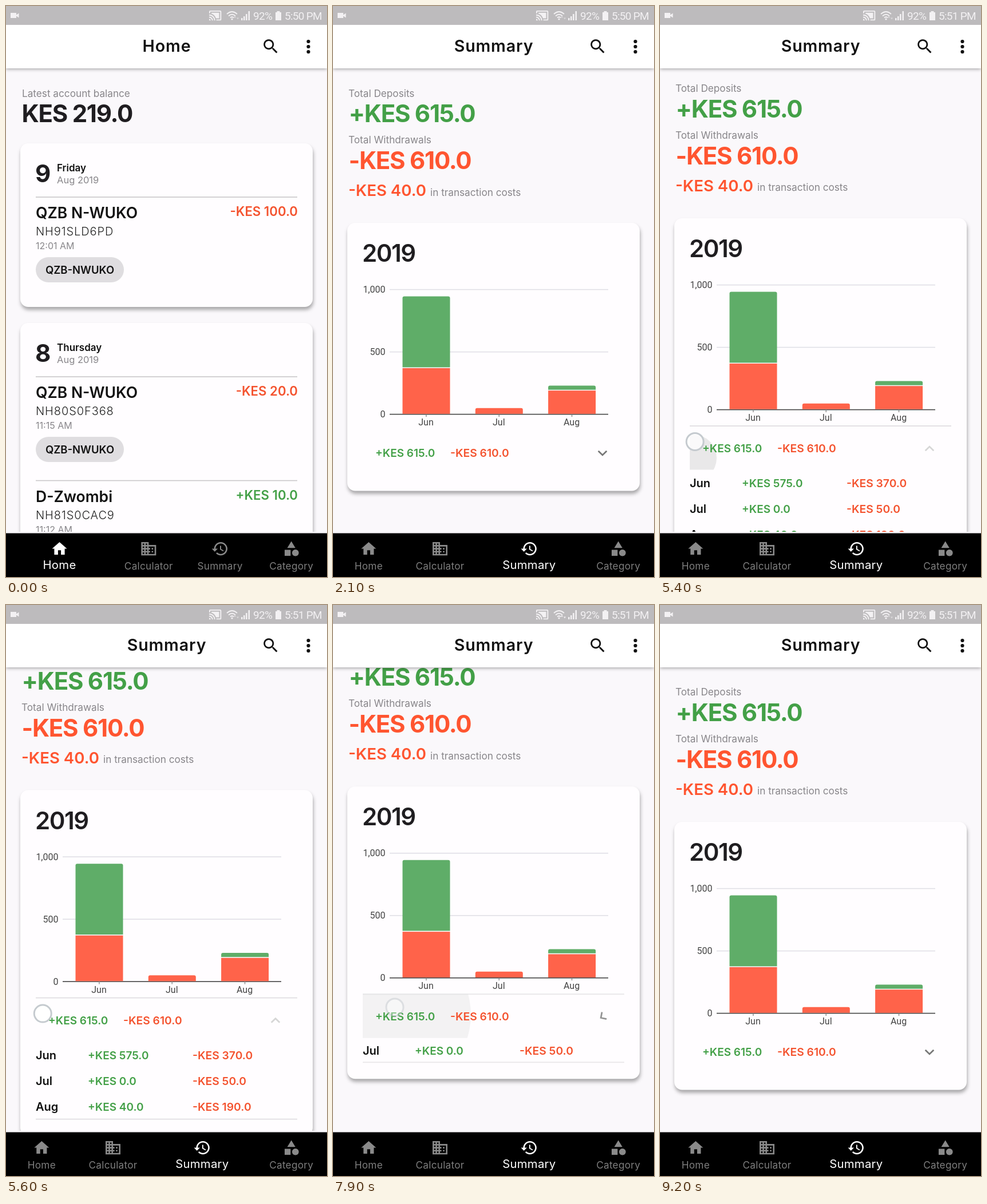
An HTML page for the animation above (9.8 s loop, 561 by 998 pixels).

```html
<!DOCTYPE html>
<html lang="en">
<head>
<meta charset="utf-8">
<style>
  html, body { margin: 0; width: 100%; height: 100%; overflow: hidden; background: #faf8fb; }
  svg { display: block; width: 100vw; height: 100vh; font-family: Inter, sans-serif; }
  .card { fill: #fffdff; filter: drop-shadow(1.5px 5px 3px rgba(0, 0, 0, .33)); }
  .bar { filter: drop-shadow(0 1px 3px rgba(0, 0, 0, .4)); }
  .roboto { font-family: Roboto, sans-serif; }
</style>
</head>
<body>
<svg id="stage" viewBox="0 0 561 998" preserveAspectRatio="none"></svg>
<script>
const LOOP = 9800, STEP = 100;
const GREEN = '#43a047', RED = '#f4532f', INK = '#1f1d20', GREY = '#88868a', STATUS = '#f3f1f3';
const BODY = 135.5;                      // height of the open month list
const NAV_ICONS = {
  Home: 'M10 20v-6h4v6h5v-8h3L12 3 2 12h3v8z',
  Calculator: 'M12 7V3H2v18h20V7H12zM6 19H4v-2h2v2zm0-4H4v-2h2v2zm0-4H4V9h2v2zm0-4H4V5h2v2zm4 12H8v-2h2v2zm0-4H8v-2h2v2zm0-4H8V9h2v2zm0-4H8V5h2v2zm10 12h-8v-2h2v-2h-2v-2h2v-2h-2V9h8v10zm-2-8h-2v2h2v-2zm0 4h-2v2h2v-2z',
  Summary: 'M13 3c-4.97 0-9 4.03-9 9H1l3.89 3.89.07.14L9 12H6c0-3.87 3.13-7 7-7s7 3.13 7 7-3.13 7-7 7c-1.93 0-3.68-.79-4.94-2.06l-1.42 1.42C8.27 19.99 10.51 21 13 21c4.97 0 9-4.03 9-9s-4.03-9-9-9zm-1 5v5l4.28 2.54.72-1.21-3.5-2.08V8H12z',
  Category: 'M12 2l-5.5 9h11zM3 13.5h8v8H3zM17.5 13a4.5 4.5 0 1 0 .01 0z'
};
const SEARCH = 'M15.5 14h-.79l-.28-.27A6.5 6.5 0 1 0 13.73 14.43l.27.28v.79l5 4.99L20.49 19zm-6 0a4.5 4.5 0 1 1 0-9 4.5 4.5 0 0 1 0 9z';
const CAST = 'M21 3H3c-1.1 0-2 .9-2 2v3h2V5h18v14h-7v2h7c1.1 0 2-.9 2-2V5c0-1.1-.9-2-2-2zM1 18v3h3c0-1.66-1.34-3-3-3zm0-4v2c2.76 0 5 2.24 5 5h2c0-3.87-3.13-7-7-7zm0-4v2c4.97 0 9 4.03 9 9h2c0-6.08-4.93-11-11-11zM5 7v1.63c3.96 1.28 7.09 4.41 8.37 8.37H19V7z';

const clamp = (v, lo = 0, hi = 1) => Math.min(hi, Math.max(lo, v));
const mix = (a, b, k) => a + (b - a) * k;
const text = (s, x, y, size, weight = 400, fill = INK, extra = '') =>
  `<text x="${x}" y="${y}" font-size="${size}" font-weight="${weight}" fill="${fill}" ${extra}>${s}</text>`;
const rect = (x, y, w, h, fill, extra = '') =>
  `<rect x="${x}" y="${y}" width="${w}" height="${h}" fill="${fill}" ${extra}/>`;
const card = (y, h, id = '') => `<rect ${id} class="card" x="25" y="${y}" width="511" height="${h}" rx="14"/>`;
const rule = (y, fill = '#c9c7c9') => rect(52, y - .8, 457, 1.6, fill);
const spaced = em => `letter-spacing="${em}em"`;
const caption = (s, x, y) => text(s, x, y, 17.2, 400, GREY);
const headline = (s, y, fill) => text(s, 27.5, y, 42, 700, fill, spaced(-.03));
const END = 'text-anchor="end"', MID = 'text-anchor="middle"';

function day(y, date, name) {
  return text(date, 51, y + 67.5, 42, 700) + text(name, 89, y + 49, 17, 600, '#111') +
    text('Aug 2019', 89, y + 70, 16.5, 400, GREY);
}

function entry(y, name, code, time, amount, fill, chip) {
  return rule(y) + text(name, 52, y + 37, 26.5, 600, '#111') +
    text(code, 52, y + 67, 20, 300, '#222', spaced(.045)) + text(time, 52, y + 91, 16, 400, GREY) +
    text(amount, 510, y + 33, 22.2, 600, fill, END) +
    (chip ? rect(52, y + 105, 154, 44, '#dfdde0', 'rx="22"') + text(chip, 129, y + 134, 18.5, 600, '#111', MID) : '');
}

const homePage = caption('Latest account balance', 28, 158.5) + headline('KES 219.0', 203, INK) +
  card(240, 286) + day(240, 9, 'Friday') +
  entry(334, 'QZB N-WUKO', 'NH91SLD6PD', '12:01 AM', '-KES 100.0', RED, 'QZB-NWUKO') +
  card(554, 460) + day(554, 8, 'Thursday') +
  entry(648, 'QZB N-WUKO', 'NH80S0F368', '11:15 AM', '-KES 20.0', RED, 'QZB-NWUKO') +
  entry(829.5, 'D-Zwombi', 'NH81S0CAC9', '11:12 AM', '+KES 10.0', GREEN);

function chart() {
  const axis = 713.6, scale = .218;
  const months = [['Jun', 575, 370], ['Jul', 0, 50], ['Aug', 40, 190]];
  const grid = [0, 500, 1000].map(v => {
    const y = axis - v * scale;
    return rect(99, y - .8, 382, 1.6, v ? '#e0dfe6' : '#444') +
      text(v.toLocaleString('en-US'), 91.5, y + 5.7, 16, 400, '#444', `class="roboto" ${END}`);
  }).join('');
  const bars = months.map(([name, inflow, outflow], i) => {
    const x = 121.5 + 127.3 * i, split = axis - outflow * scale, top = split - inflow * scale;
    const rounded = (y, bottom, fill) =>
      `<path d="M${x} ${bottom}V${y + 3}q0-3 3-3h77q3 0 3 3V${bottom}z" fill="${fill}"/>`;
    return (inflow ? rounded(top, split - 1.5, '#5fad68') + rect(x, split, 83, axis - split - .8, '#ff634a')
                   : rounded(split, axis - .8, '#ff634a')) +
      rect(x + 40.7, axis, 1.4, 4.5, '#888') +
      text(name, x + 41, 733, 16, 400, '#444', `class="roboto" ${MID}`);
  }).join('');
  return grid + bars;
}

const monthRows = [['Jun', '575.0', '370.0'], ['Jul', '0.0', '50.0'], ['Aug', '40.0', '190.0']]
  .map(([name, inflow, outflow], i) => {
    const y = 849 + 45.2 * i;
    return text(name, 52, y, 20, 600, '#111') + text('+KES ' + inflow, 143, y, 19, 600, GREEN) +
      text('-KES ' + outflow, 326, y, 19.3, 600, RED);
  }).join('');

const summaryPage = caption('Total Deposits', 27, 158.5) + headline('+KES 615.0', 203, GREEN) +
  caption('Total Withdrawals', 27, 240) + headline('-KES 610.0', 285, '#ff5530') +
  text('-KES 40.0', 27, 332, 27.6, 600, '#ff5530') + caption('in transaction costs', 170, 331.5) +
  card(379, 468.5, 'id="panel"') + text('2019', 51, 447, 42, 600, INK, spaced(-.035)) + chart() +
  `<g clip-path="url(#tileClip)"><circle id="ripple" fill="#c8c8c8"/></g>` +
  `<g id="edges">${rule(742, '#dddbde')}<g id="lowEdge">${rule(818, '#dddbde')}</g></g>` +
  text('+KES 615.0', 74, 788, 19, 600, GREEN) + text('-KES 610.0', 205, 788, 19.3, 600, RED) +
  `<path id="chevron" d="M-7.3-3.7 0 3.4 7.3-3.7" fill="none" stroke-width="2.8"/>` +
  `<g clip-path="url(#bodyClip)"><g id="rows">${monthRows}</g></g>`;

const statusBar = rect(0, 0, 561, 33, '#bdbbbd') + `<g fill="${STATUS}">
  <path d="M8 12h10v3.5l4.5-3v8l-4.5-3V21H8z"/>
  <path d="${CAST}" transform="translate(354 5) scale(.97)"/>
  <g fill="none" stroke="${STATUS}" stroke-width="1.8">
    <path d="M386 14q9-8 18 0M389 17.5q6-5.5 12 0M392 20.5q3-2.5 6 0"/></g>
  <circle cx="395" cy="23" r="1.6"/>
  <g id="traffic"><path d="M398 20.5l2-3 2 3zM403 20.5h4l-2 3z"/></g>
  <path d="M411 21h2.5v4h-2.5zM415 18h2.5v7h-2.5zM419 14h2.5v11h-2.5zM423.5 9h2.5v16h-2.5z"/>
  <path d="M471 11h2.5V9h5v2h2.5v14h-10z"/></g>` +
  text('92%', 432, 24.3, 19, 400, STATUS, 'class="roboto" letter-spacing="-.7"') +
  text('', 552, 24.3, 19, 400, STATUS, `id="clock" class="roboto" ${END} letter-spacing="-.7"`);

const appBar = rect(0, 33, 561, 76, '#fff', 'class="bar"') +
  text('', 281, 80.3, 28.6, 600, '#111', `id="title" ${MID} ${spaced(.03)}`) +
  `<path d="${SEARCH}" transform="translate(446 54) scale(1.39)" fill="#111"/>` +
  [62, 71, 80].map(y => `<circle cx="528.5" cy="${y}" r="3.1" fill="#111"/>`).join('');

const navBar = rect(0, 919, 561, 3, '#f6f4f7') + rect(0, 921.5, 561, 77, '#000') +
  `<g clip-path="url(#navClip)"><circle id="navRipple" cx="374" cy="950" fill="#c8c8c8"/></g>` +
  Object.entries(NAV_ICONS).map(([name, d]) => `<g class="tab">
    <path d="${d}" transform="translate(-15.6 933) scale(1.3)"/>${text(name, 0, 985, 17.2, 400, '', `${MID} ${spaced(.015)}`)}</g>`).join('');

const stage = document.getElementById('stage');
stage.innerHTML = `<defs>
  <clipPath id="tileClip">${rect(52, 741.5, 457, 77, '#000')}</clipPath>
  <clipPath id="bodyClip"><rect id="bodyBox" x="25" y="818" width="511"/></clipPath>
  <clipPath id="navClip">${rect(0, 921.5, 561, 77, '#000')}</clipPath></defs>` +
  rect(0, 0, 561, 998, '#faf8fb') + `<g id="home">${homePage}</g><g id="summary">${summaryPage}</g>` +
  appBar + statusBar + navBar +
  `<circle id="touch" r="15" fill="#fff" fill-opacity=".75" stroke="#c5cacf" stroke-width="3"/>`;

const parts = Object.fromEntries([...stage.querySelectorAll('[id]')].map(el => [el.id, el]));
const tabs = [...stage.querySelectorAll('.tab')];
const set = (el, attrs) => { for (const k in attrs) el.setAttribute(k, attrs[k]); };

// Ink grows slowly while pressed, then fast while fading after release
function ink(t, down) {
  const held = t - down, after = held - 100;
  if (held < 0) return { r: 0, opacity: 0 };
  return { r: after < 0 ? 8 + .17 * held : 25 + 1.08 * after, opacity: .4 * clamp(1 - Math.max(0, after) / 220) };
}

const TAPS = [[1600, 374, 950], [3700, 108, 780], [7700, 108, 703]];
const DRAG = { from: 5200, to: 6100, x: 58, y: 798, length: 222, slop: 28.5 };
const MAX_SCROLL = 75;

function drawNav(t) {
  const p = clamp((t - 1700) / 200), k = p * p * (3 - 2 * p);
  const active = [1 - k, 0, k, 0];
  let left = 0;
  tabs.forEach((tab, i) => {
    const a = active[i], width = 561 / 4.5 * (1 + .5 * a);
    const shade = v => `rgb(${Array(3).fill(Math.round(mix(v, 255, a)))})`;
    tab.setAttribute('transform', `translate(${left + width / 2} 0)`);
    set(tab.firstElementChild, { fill: shade(138) });
    set(tab.lastElementChild, { 'font-size': mix(17.2, 20.3, a), y: mix(985, 983.5, a), fill: shade(126) });
    left += width;
  });
  set(parts.navRipple, ink(t, 1600));
}

function draw(t) {
  const onHome = t < 1700;
  set(parts.home, { display: onHome ? 'inline' : 'none' });
  set(parts.summary, { display: onHome ? 'none' : 'inline' });
  parts.title.textContent = onHome ? 'Home' : 'Summary';
  parts.clock.textContent = t < 3400 ? '5:50 PM' : '5:51 PM';
  set(parts.traffic, { opacity: t >= 7100 && t < 9200 ? 1 : .55 });
  drawNav(t);

  const drag = clamp((t - DRAG.from) / (DRAG.to - DRAG.from));
  const moved = DRAG.length * drag ** 1.2;
  const spring = Math.max(0, t - 7846) / 1000 * 14;
  const scroll = clamp(moved - DRAG.slop, 0, MAX_SCROLL) * (1 + spring) * Math.exp(-spring);
  set(parts.summary, { transform: `translate(0 ${-scroll})` });

  const progress = t < 6000 ? clamp((t - 3800) / 200) : 1 - clamp((t - 7800) / 200);
  const open = progress ** 1.67, height = BODY * open, tone = Math.round(mix(118, 214, open));
  set(parts.panel, { height: 468.5 + height });
  set(parts.bodyBox, { height });
  set(parts.rows, { transform: `translate(0 ${(height - BODY) / 2})` });
  set(parts.edges, { opacity: 1 - (1 - progress) ** 2 });
  set(parts.lowEdge, { transform: `translate(0 ${height + .5})` });
  set(parts.chevron, { transform: `translate(471 781.5) rotate(${180 * open})`, stroke: `rgb(${tone},${tone},${tone})` });

  // Finger marker and the ink it leaves on the tile
  let finger = { opacity: 0 }, ripple = { opacity: 0 };
  for (const [down, x, y] of TAPS) {
    if (t >= down && t < down + 400) {
      finger = { cx: x, cy: y, opacity: clamp(1 - (t - down - 100) / 200) };
      ripple = { cx: x, cy: down > 7000 ? y + MAX_SCROLL : y, ...ink(t, down) };
    }
  }
  if (t >= DRAG.from && t < 6400) {
    const held = t - DRAG.from;
    finger = { cx: DRAG.x + 14 * drag, cy: DRAG.y - moved, opacity: clamp(1 - (t - DRAG.to) / 200) };
    ripple = { cx: DRAG.x, cy: DRAG.y, r: .205 * held, opacity: .4 * clamp(2 - held / 200) };
  }
  set(parts.touch, finger);
  set(parts.ripple, ripple);
}

const start = performance.now();
function tick() {
  const t = (performance.now() - start) % LOOP;
  draw(Math.floor(t / STEP) * STEP);
  requestAnimationFrame(tick);
}
tick();
</script>
</body>
</html>
```
